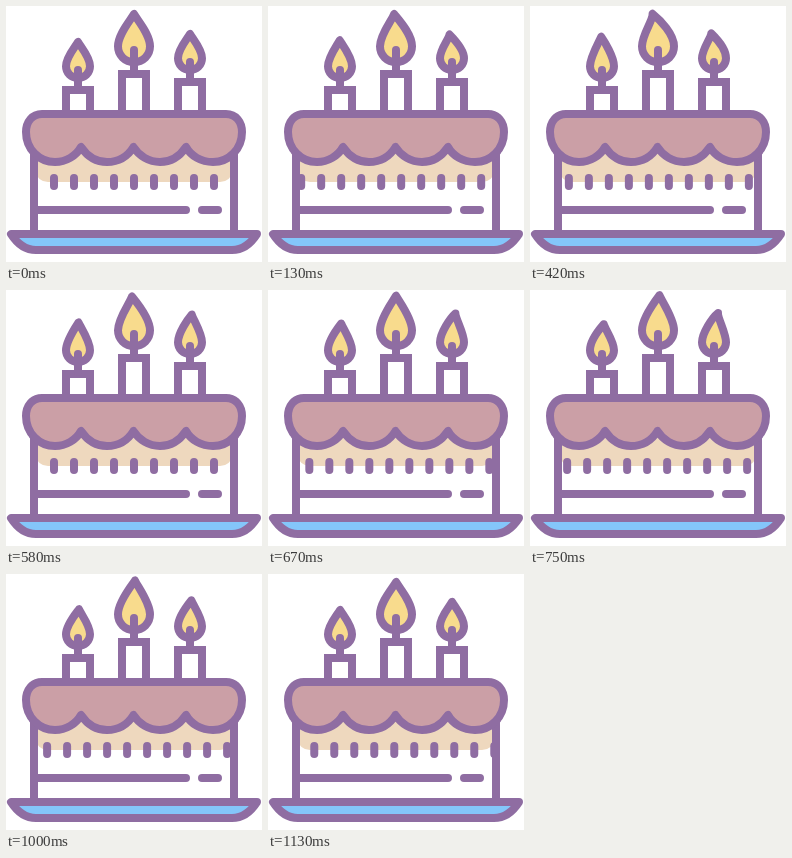
An HTML page for the animation above (1.18 s loop, 256x256 px).

```html
<!DOCTYPE html>
<html lang="en">
<head>
<meta charset="utf-8">
<title>Birthday cake</title>
<style>
  html, body { margin: 0; width: 100%; height: 100%; overflow: hidden; background: #fff; }
  svg { display: block; width: 100%; height: 100%; }
  .line { fill: none; stroke: #8f6da2; stroke-width: 8; stroke-linecap: round; stroke-linejoin: round; }
  .flame { fill: #f8db8d; }
  .candle { stroke-linejoin: miter; }
</style>
</head>
<body>
<svg viewBox="0 0 256 256">
  <clipPath id="side"><rect x="24" y="140" width="208" height="80"/></clipPath>

  <path fill="#eed8be" d="M28 140H228V164Q224 176 214 176H42Q32 176 28 164Z"/>
  <g clip-path="url(#side)"><path id="ticks" class="line"/></g>
  <path class="line" d="M28 148V228M228 148V228M28 204H180M196 204H212"/>
  <path class="line" style="fill:#84c6fa" d="M5 228H251C244 239 236 244 226 244H30C20 244 12 239 5 228Z"/>

  <path class="line candle" d="M60 106V84H84V106M116 106V68H140V106M172 106V76H196V106"/>
  <path class="line" style="fill:#cb9fa6" d="M36 108H220C230 108 236 116 236 126C236 143 223 156 207 156
    C195 156 185 150 180 141C174 150 165 156 154 156C143 156 133 150 127.500 141
    C122 150 113 156 101 156C90 156 81 150 75 141C70 150 60 156 49 156
    C33 156 20 143 20 126C20 116 26 108 36 108Z"/>
  <g id="flames"></g>
  <path class="line" d="M72 64V82M128 44V66M184 56V74"/>
</svg>
<script>
const LOOP = 1180, STEPS = 28, STEP_MS = 1000 / 24;

// x, tip y, half width, height; keys are [step, tip dx, tip dy]
const flames = [
  { x: 72,  y: 36, w: 12, h: 36, keys: [[0, 0, 0], [8, -1, -5.5], [20, 2, -1.5], [28, 0, 0]] },
  { x: 128, y: 8,  w: 16, h: 48, keys: [[0, 0, 0], [8, -6, 0], [20, 2, -3], [28, 0, 0]] },
  { x: 184, y: 28, w: 12, h: 36, keys: [[0, 0, 0], [6, -5, 1], [18, 4, -5], [28, 0, 0]] }
];

for (const f of flames) {
  f.el = document.createElementNS('http://www.w3.org/2000/svg', 'path');
  f.el.setAttribute('class', 'line flame');
  document.getElementById('flames').append(f.el);
}
const ticks = document.getElementById('ticks');

function tipAt(keys, n) {
  const i = keys.findIndex(k => k[0] > n);
  const [t0, x0, y0] = keys[i - 1], [t1, x1, y1] = keys[i];
  const e = (1 - Math.cos(Math.PI * (n - t0) / (t1 - t0))) / 2;
  return [x0 + (x1 - x0) * e, y0 + (y1 - y0) * e];
}

function flamePath({ x, y, w, h, keys }, n) {
  const [dx, dy] = tipAt(keys, n);
  const tx = x + dx, ty = y + dy;
  const base = y + h, mid = base - w * 0.98, k = w * 0.56;
  const bend = -0.8 * dx, cy = ty + h * 0.13, shoulder = mid - h * 0.25;
  return `M${tx} ${ty}C${tx - w * 0.22 + bend} ${cy} ${x - w} ${shoulder} ${x - w} ${mid}` +
    `C${x - w} ${mid + k} ${x - k} ${base} ${x} ${base}` +
    `S${x + w} ${mid + k} ${x + w} ${mid}` +
    `C${x + w} ${shoulder} ${tx + w * 0.22 + bend} ${cy} ${tx} ${ty}Z`;
}

function draw(now) {
  const n = Math.min(STEPS - 1, Math.floor((now % LOOP) / STEP_MS + 0.1));
  const u = 2 * Math.PI * n / STEPS;
  const shift = 11.8 * Math.sin(u - 0.35 * Math.sin(u));
  let d = '';
  for (let x = 8; x <= 248; x += 20) d += `M${x + shift} 172v8`;
  ticks.setAttribute('d', d);
  for (const f of flames) f.el.setAttribute('d', flamePath(f, n));
}

const start = performance.now();
function loop() {
  draw(performance.now() - start);
  requestAnimationFrame(loop);
}
loop();
</script>
</body>
</html>
```
